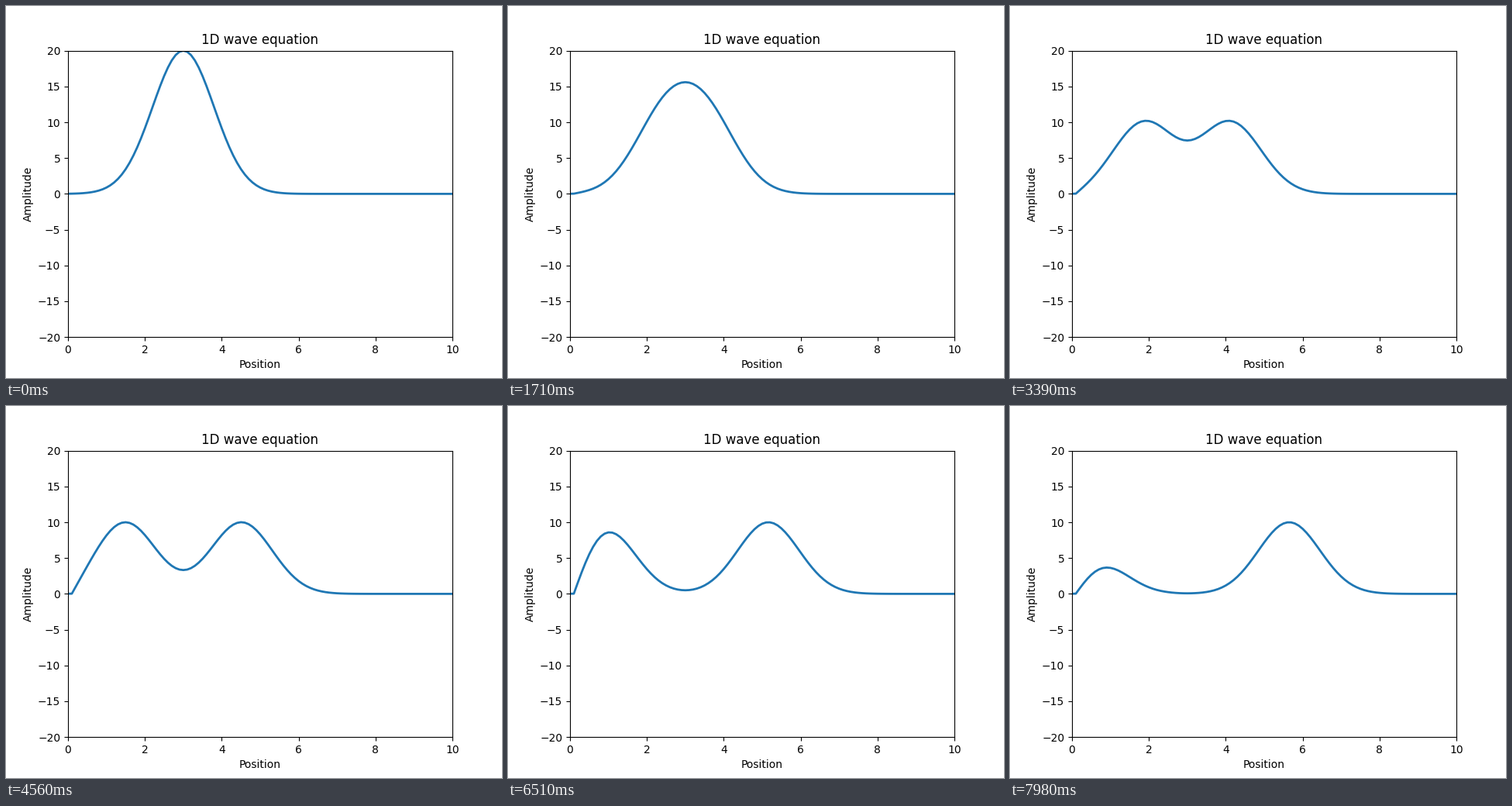
A matplotlib script that plays this animation: 640 px wide and 480 px high, repeating every 8 s.

```python
import numpy as np
import matplotlib.pyplot as plt
from matplotlib.animation import FuncAnimation

LOOP_MS = 8000
TICK_MS = 20
STEP_MS = 30      # one solver step stays on screen this long

LENGTH = 10
SPEED = 1.0
DT = 0.01
x = np.linspace(0, LENGTH, 101)
courant2 = (SPEED * DT / (x[1] - x[0])) ** 2


def solve(steps):
    """Leapfrog solution of the wave equation, starting at rest."""
    start = 20 * np.exp(-((x - 3) ** 2) / (2 * 0.8 ** 2))
    states = [start, start.copy()]
    while len(states) < steps:
        prev, cur = states[-2:]
        new = cur.copy()
        # the two leftmost points and the last one are held fixed
        bend = cur[3:] - 2 * cur[2:-1] + cur[1:-2]
        new[2:-1] = 2 * cur[2:-1] - prev[2:-1] + courant2 * bend
        states.append(new)
    return states


states = solve(LOOP_MS // STEP_MS + 1)

fig, ax = plt.subplots(figsize=(6.4, 4.8), dpi=100)
line, = ax.plot(x, states[0], color="#1f77b4", lw=2)
ax.set_xlim(0, LENGTH)
ax.set_ylim(-20, 20)
ax.set_title("1D wave equation")
ax.set_xlabel("Position")
ax.set_ylabel("Amplitude")


def update(tick):
    middle = tick * TICK_MS + TICK_MS // 2
    line.set_ydata(states[middle // STEP_MS])
    return line,


anim = FuncAnimation(fig, update, frames=LOOP_MS // TICK_MS,
                     interval=TICK_MS, repeat=True, repeat_delay=0)
plt.show()
```
